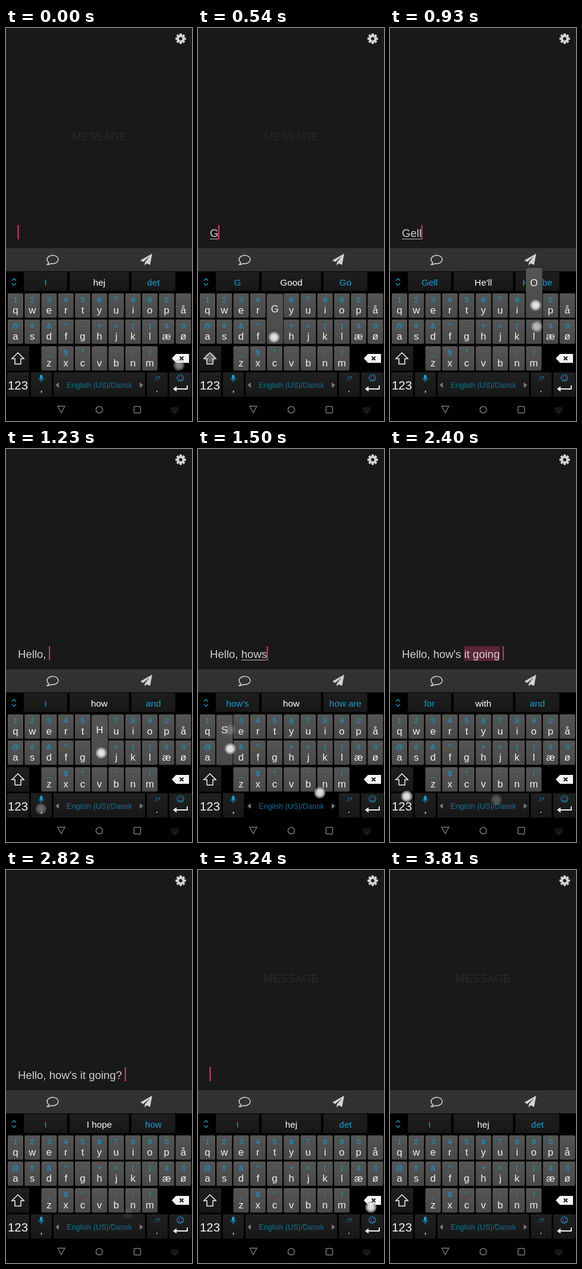
Write an HTML page with a canvas that moves like this. It is 313 by 662 pixels and loops after 3840 ms.

```html
<!DOCTYPE html>
<html lang="en">
<head>
<meta charset="utf-8">
<title>Typing with autocorrect</title>
<style>
html, body { margin: 0; width: 100%; height: 100%; overflow: hidden; background: #191919; }
canvas { display: block; width: 313px; height: 662px; }
</style>
</head>
<body>
<canvas id="stage"></canvas>
<script>
const W = 313, H = 662, LOOP = 3840;
const CYAN = '#129fce', PINK = '#d83a6e', WHITE = '#f2f2f2';
const canvas = document.getElementById('stage');
const c = canvas.getContext('2d');
const scale = window.devicePixelRatio || 1;
canvas.width = W * scale;
canvas.height = H * scale;

const clamp = v => Math.max(0, Math.min(1, v));
const font = size => `${size}px "Liberation Sans", Arial, sans-serif`;

function label(text, x, y, size, color, align = 'center') {
  c.font = font(size);
  c.textAlign = align;
  c.fillStyle = color;
  c.fillText(text, x, y);
}
function box(x, y, w, h, top, bottom = top, radius = 2) {
  const g = c.createLinearGradient(0, y, 0, y + h);
  g.addColorStop(0, top);
  g.addColorStop(1, bottom);
  c.fillStyle = g;
  c.beginPath();
  c.roundRect(x, y, w, h, radius);
  c.fill();
}
function path(points, closed) {
  c.beginPath();
  for (let i = 0; i < points.length; i += 2) c.lineTo(points[i], points[i + 1]);
  if (closed) c.closePath();
}
function fill(points, color) {
  path(points, true);
  c.fillStyle = color;
  c.fill();
}
function line(points, color, width = 1.5, closed = false) {
  path(points, closed);
  stroke(color, width);
}
function stroke(color, width) {
  c.strokeStyle = color;
  c.lineWidth = width;
  c.stroke();
}
function circle(x, y, r, from = 0, to = Math.PI * 2) {
  c.beginPath();
  c.arc(x, y, r, from, to);
}

// Keyboard layout
const keys = {};
[['qwertyuiopå', '1234567890 ', 0, 447],
 ['asdfghjklæø', '@#&*-+=()äö', 0, 491],
 ['zxcvbnm', '_$"\':;/', 2, 536]].forEach(([letters, hints, column, y]) =>
  [...letters].forEach((ch, i) => {
    keys[ch] = { ch, hint: hints[i], x: 3 + (column + i) * 28.25, y };
  }));

// Touches: time, key or point, hold time
const spots = { shift: [20, 556], space: [205, 579], space2: [179, 591],
                comma: [59, 606], num: [28, 585], mark: [254, 604], erase: [291, 568] };
const touches = [
  [-140, 'erase', 100], [420, 'shift'], [510, 'g'], [630, 'e'], [735, 'l'], [840, 'l'],
  [915, 'o'], [1020, 'space'], [1110, 'comma'], [1210, 'h'], [1310, 'o'], [1365, 'w'],
  [1470, 's'], [1485, 'space'], [1620, 'i'], [1710, 't'], [1800, 'n', 50], [1860, 'g'],
  [1905, 'o'], [1980, 'i'], [2050, 'n'], [2130, 'g'], [2270, 'space2'], [2370, 'num'],
  [2580, 'mark'], [2670, 'space'], [2940, 'erase', 390],
].map(([time, key, hold = 60]) => ({ time, key, hold }));
const offsets = { o: [3, -1], l: [5, -9], s: [10, -7], w: [10, 5], g: [-1, 9], n: [-8, 22] };

function touchPoint({ key, time }) {
  if (spots[key]) return spots[key];
  const k = keys[key], [dx, dy] = offsets[key] || [3, 0];
  return [k.x + 13 + (time === 1905 ? -10 : dx), k.y + 21 + dy];
}

// Written text: time, text, start of the word being composed, suggestions
const FULL = "Hello, how's it going? ";
const states = [
  [0, '', -1, 'I|hej|det'],
  [540, 'G', 0, 'G|Good|Go'],
  [660, 'Ge', 0, 'Ge|Get|Gerne'],
  [765, 'Gel', 0, 'Gel|Get|Gel be'],
  [870, 'Gell', 0, "Gell|He'll|He'll be"],
  [945, 'Gello', 0, 'Gello|Hello|Hell'],
  [1050, 'Hello ', -1, 'I|there|and'],
  [1140, 'Hello, ', -1, 'I|how|and'],
  [1240, 'Hello, h', 7, 'h|how|he'],
  [1340, 'Hello, ho', 7, 'ho|how|hope'],
  [1395, 'Hello, how', 7, 'how|how are|how is'],
  [1490, 'Hello, hows', 7, "how's|how|how are"],
  [1530, "Hello, how's ", -1, 'your|the|it'],
  [1650, "Hello, how's i", 13, 'i|it|in'],
  [1740, "Hello, how's it", 13, 'it|it going|its'],
  [1830, "Hello, how's itn", 13, 'itn|it|it n'],
  [1890, "Hello, how's itng", 13, 'itng|it g|it going'],
  [1935, "Hello, how's itngo", 13, 'itngo|it go|it going'],
  [2010, "Hello, how's itngoi", 13, 'itngoi|it going|it go'],
  [2080, "Hello, how's itngoin", 13, 'itngoin|it going|it go'],
  [2160, "Hello, how's itngoing", 13, 'itngoing|it going|going'],
  [2300, "Hello, how's it going ", -1, 'for|with|and'],
  [2610, "Hello, how's it going?", -1, 'I|I hope|how'],
  [2700, FULL, -1, 'I|I hope|how'],
  [3200, '', -1, 'I|hej|det'],
].map(([time, text, compose, words]) => ({ time, text, compose, words: words.split('|') }));

function drawMessage(t, state) {
  box(0, 0, W, 371, '#191919', '#191919', 0);
  c.globalAlpha = t < 3000 ? 1 - clamp((t - 510) / 190) : clamp((t - 3190) / 30);
  label('MESSAGE', 157, 189, 18.6, '#2b2b2b');
  c.globalAlpha = 1;

  let text = state.text;
  if (t >= 2970 && t < 3200) text = text.slice(0, Math.ceil(FULL.length * (3200 - t) / 230));
  c.font = font(18.6);
  const xAt = n => 20 + c.measureText(text.slice(0, n)).width;
  const end = xAt(text.length);
  if (t >= 2300 && t < 2560) {
    c.globalAlpha = 1 - clamp((t - 2440) / 120);
    box(xAt(13), 332, xAt(21) - xAt(13), 25, '#5c2539', '#5c2539', 0);
    c.globalAlpha = 1;
  }
  label(text, 20, 352, 18.6, '#cfcfcf', 'left');
  if (state.compose >= 0) {
    const start = xAt(state.compose);
    box(start, 355, end - start, 1, '#b5b5b5', '#b5b5b5', 0);
  }
  if (t < 3700) box(end - 0.5, 332, 2, 24, PINK, PINK, 0);
}

function drawGear() {
  c.save();
  c.translate(294, 18);
  c.fillStyle = '#d2d2d2';
  for (let i = 0; i < 8; i++) {
    c.fillRect(-2, -8.8, 4, 5);
    c.rotate(Math.PI / 4);
  }
  c.restore();
  circle(294, 18, 4.7);
  stroke('#d2d2d2', 4);
}

function drawToolbar() {
  box(0, 371, W, 39, '#333', '#303030', 0);
  c.beginPath();
  c.ellipse(78.5, 390, 9.5, 7, 0, Math.PI * 0.72, Math.PI * 2.6);
  c.quadraticCurveTo(73, 399, 69.5, 398.5);
  c.quadraticCurveTo(72, 397, 71.8, 394.5);
  stroke('#cfcfcf', 1.6);
  fill([246, 380, 226, 391.5, 231, 394, 242, 384.5, 233.5, 395, 233.5, 400, 236.5, 396.5, 242.5, 399], '#d2d2d2');
}

function drawSuggestions(words) {
  line([10, 425.5, 13.5, 422, 17, 425.5], CYAN, 1.3);
  line([10, 430, 13.5, 433.5, 17, 430], CYAN, 1.3);
  [[30, 73], [107, 100], [211, 74]].forEach(([x, w], i) => {
    box(x, 411, w, 32, '#1e1e1e', '#171717', 1);
    label(words[i], x + w / 2, 434, 15.3, i === 1 ? '#fff' : CYAN);
  });
}

function drawKeyboard(symbols, spacePressed) {
  for (const { ch, hint, x, y } of Object.values(keys)) {
    box(x, y, 26, 41, '#555', '#484848');
    if (symbols) {
      label(hint, x + 13, y + 28, 17, WHITE);
    } else {
      label(hint, x + 13, y + 14.5, 12.5, CYAN);
      label(ch, x + 13, y + 34, 16.8, WHITE);
    }
  }
  [[2, 536, 37], [2, 580, 37], [42, 580, 35], [237, 580, 35], [275, 580, 37]]
    .forEach(([x, y, w]) => box(x, y, w, 41, '#202020', '#171717'));
  if (!spacePressed) box(80, 580, 154, 41, '#202020', '#171717');

  line([20, 547, 30, 557, 25, 557, 25, 566, 15, 566, 15, 557, 10, 557], WHITE, 1.5, true);
  fill([279, 556.5, 286, 549, 308, 549, 308, 564, 286, 564], WHITE);
  line([292.5, 553.5, 298.5, 559.5], '#111', 1.8);
  line([298.5, 553.5, 292.5, 559.5], '#111', 1.8);

  label(symbols ? 'abc' : '123', 20, 609, 20.4, WHITE);
  box(57, 584, 4.5, 8, CYAN, CYAN, 2.2);
  circle(59.2, 589.5, 4, 0, Math.PI);
  stroke(CYAN, 1);
  line([59.2, 593.5, 59.2, 596.5], CYAN, 1);
  label(',', 59.5, 613, 17, WHITE);
  fill([83, 601.5, 89, 597, 89, 606], '#777');
  fill([231, 601.5, 225, 597, 225, 606], '#777');
  label('English (US)/Dansk', 157, 606, 12.6, '#0c7596');
  label(',!?', 254, 593, 9.5, CYAN);
  label(symbols ? '?' : '.', 254, 613, 16, WHITE);

  circle(293.5, 589.5, 5.5);
  stroke(CYAN, 1.1);
  circle(293.5, 590.2, 3, 0.2, Math.PI - 0.2);
  stroke(CYAN, 1);
  c.fillStyle = CYAN;
  c.fillRect(291, 587, 1.3, 1.5);
  c.fillRect(295, 587, 1.3, 1.5);
  line([305, 602, 305, 608, 284, 608], WHITE, 1.8);
  fill([281, 608, 287, 603.5, 287, 612.5], WHITE);
}

function drawNavigation() {
  line([87, 637, 99, 637, 93, 648], '#777', 1.4, true);
  circle(157, 643, 5.5);
  stroke('#777', 1.5);
  c.beginPath();
  c.roundRect(215.5, 637.5, 11, 11, 1.5);
  stroke('#777', 1.5);
  c.fillStyle = '#555';
  for (let row = 0; row < 3; row++)
    for (let i = 0; i < 5; i++) c.fillRect(278 + i * 2.6, 639.5 + row * 2.6, 1.3, 1.3);
  c.fillRect(281, 647.3, 6, 1);
}

function drawPopup({ ch, x, y }) {
  box(x - 1, y - 44, 29, 86, '#222', '#222', 3);
  box(x, y - 43, 27, 84, '#555', '#484848', 3);
  label(ch.toUpperCase(), x + 13.3, y - 12.5, 16.8, WHITE);
}

function drawTouch(touch, age) {
  const fade = 1 - clamp((age - touch.hold) / 100);
  const [x, y] = touchPoint(touch);
  const g = c.createRadialGradient(x, y, 0, x, y, 10);
  g.addColorStop(0, '#ffffffe0');
  g.addColorStop(0.5, '#f4f4f4d8');
  g.addColorStop(0.7, '#c0c0c0c0');
  g.addColorStop(0.9, '#999999a0');
  g.addColorStop(1, '#88888800');
  c.globalAlpha = fade;
  circle(x, y, 10);
  c.fillStyle = g;
  c.fill();
  c.globalAlpha = 1;
}

function draw(t) {
  c.setTransform(scale, 0, 0, scale, 0, 0);
  const state = states.findLast(s => s.time <= t);
  const active = touches.filter(({ time, hold }) => t >= time && t < time + hold + 100);
  const spacePressed = active.some(({ time, key, hold }) => key.startsWith('space') && t < time + hold);
  box(0, 0, W, H, '#000', '#000', 0);
  drawMessage(t, state);
  drawGear();
  drawToolbar();
  drawSuggestions(state.words);
  drawKeyboard(t >= 2440 && t < 2700, spacePressed);
  drawNavigation();

  for (const { time, key } of active)
    if (keys[key] && t < time + 50) drawPopup(keys[key]);
  for (const touch of active) drawTouch(touch, t - touch.time);
}

const start = performance.now();
function frame() {
  draw((performance.now() - start) % LOOP);
  requestAnimationFrame(frame);
}
frame();
</script>
</body>
</html>
```
